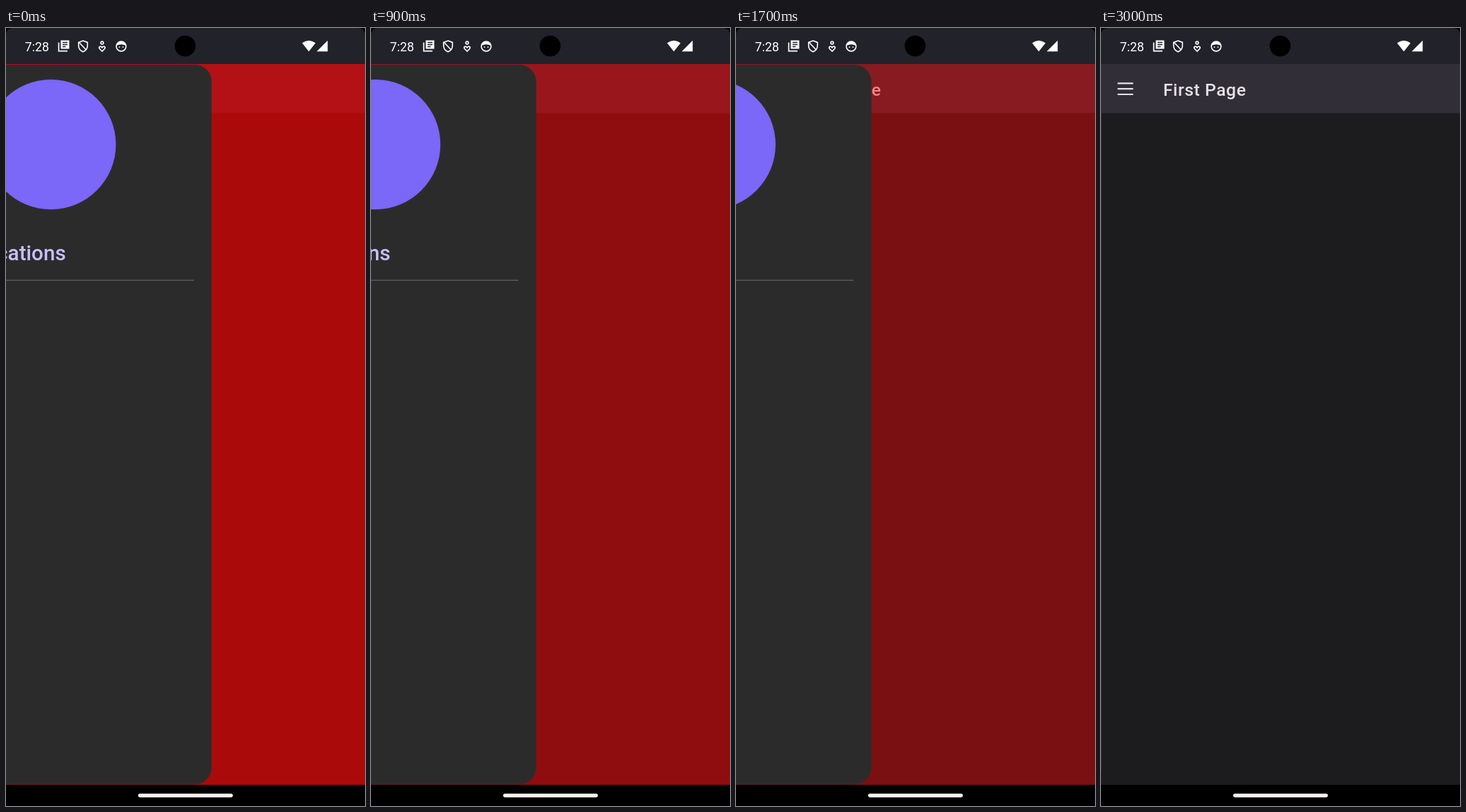
Write an HTML page that moves like this. It is 508 px wide and 1102 px high and loops after 3100 ms.

```html
<!DOCTYPE html>
<html lang="en">
<head>
<meta charset="utf-8">
<title>Navigation drawer</title>
<style>
  html, body { margin: 0; width: 100%; height: 100%; overflow: hidden; background: #000; }
  svg { display: block; width: 508px; height: 1102px; font-family: Roboto, sans-serif; }
  .title { font-size: 24.7px; font-weight: 500; letter-spacing: .55px; fill: #e6e1e5; }
  .item { font-size: 29.64px; font-weight: 500; fill: #c8bfff; }
  .clock { font-size: 17.7px; fill: #fff; }
</style>
</head>
<body>
<svg viewBox="0 0 508 1102">
  <defs>
    <clipPath id="content"><rect y="51" width="508" height="1021"/></clipPath>
  </defs>

  <g clip-path="url(#content)">
    <rect y="51" width="508" height="1021" fill="#1c1b1d"/>
    <rect y="51" width="508" height="69.5" fill="#312e38"/>
    <path d="M23.5 78.3h22M23.5 86.2h22M23.5 94h22" stroke="#e6e1e5" stroke-width="2.2"/>
    <text class="title" x="88" y="95.6">First Page</text>
    <rect id="scrim" y="51" width="508" height="1021" fill="#f00"/>

    <!-- The drawer's right edge is its local x = 0 -->
    <g id="drawer">
      <rect x="-460" y="52" width="460" height="1019.5" rx="24" fill="#2c2b2c"/>
      <circle cx="-227.5" cy="165" r="92" fill="#7b67f8"/>
      <text class="item" x="-376.5" y="329">Notifications</text>
      <path d="M-435 357.3H-25" stroke="#5f5c61" stroke-width="1.3"/>
      <text class="item" x="-376.5" y="409.5">Help</text>
    </g>
  </g>

  <!-- Status bar -->
  <path d="M0 51V10Q0 0 10 0H498Q508 0 508 10V51Z" fill="#21222a"/>
  <circle cx="253.5" cy="25.5" r="14.8"/>
  <text class="clock" x="26.8" y="32.6">7:28</text>
  <g fill="#fff">
    <path d="M77.5 17.5h12v12h-12z"/>
    <path d="M80 20.5h7M80 23.5h7M80 26.5h4.5" stroke="#21222a" stroke-width="1.3"/>
    <path d="M74.6 20.5V32.6H87" fill="none" stroke="#fff" stroke-width="1.7"/>
    <path d="M428.5 33.3L419 21.3Q428.500 14.300 438 21.300Z"/>
    <path d="M455.200 17.700V33.200H439.700Z"/>
  </g>
  <g fill="none" stroke="#fff" stroke-width="1.6">
    <path d="M109 18l6.300 2.400v4.600q0 6-6.300 8.700q-6.300-2.700-6.300-8.700v-4.600zM103.500 20.500l9.500 10"/>
    <circle cx="136" cy="21" r="1.900"/>
    <path d="M136 33l-3.700-3.700q-1.200-1.700 .3-2.800q1.700-1 3.400 1.200q1.700-2.200 3.400-1.200q1.500 1.100 .3 2.800z"/>
    <circle cx="163" cy="26" r="6.900"/>
  </g>
  <path d="M156.500 24.800Q157 19.500 163 19Q169 19.500 169.500 24.800Q163 21.500 156.500 24.800Z" fill="#fff"/>
  <path d="M160.500 26.300v1.600M165.500 26.300v1.600" stroke="#fff" stroke-width="1.500"/>

  <!-- Gesture bar -->
  <rect y="1072" width="508" height="30"/>
  <rect x="187" y="1084.500" width="134" height="5.200" rx="2.600" fill="#f5f2ef"/>
</svg>

<script>
  const LOOP = 3100, STEP = 100, OPEN_WIDTH = 462;
  const drawer = document.getElementById('drawer');
  const scrim = document.getElementById('scrim');

  // Drag path: [time in ms, right edge of the drawer]
  const path = [
    [0, 291], [200, 200], [300, 188], [500, 262], [600, 192.5], [700, 165],
    [1300, 355], [1700, 191.5], [2000, 106], [3000, 1]
  ];

  function slope(i) {
    const a = path[Math.max(i - 1, 0)];
    const b = path[Math.min(i + 1, path.length - 1)];
    return (b[1] - a[1]) / (b[0] - a[0]);
  }

  // Smooth cubic through the path points
  function edgeAt(t) {
    let i = 0;
    while (i < path.length - 2 && t >= path[i + 1][0]) i++;
    const [t0, x0] = path[i], [t1, x1] = path[i + 1];
    const d = t1 - t0, u = (t - t0) / d, v = 1 - u;
    return v * v * (1 + 2 * u) * x0 + u * u * (3 - 2 * u) * x1
      + d * u * v * (v * slope(i) - u * slope(i + 1));
  }

  const start = performance.now();

  function draw() {
    const t = (performance.now() - start) % LOOP;
    const edge = edgeAt(Math.floor(t / STEP) * STEP);
    drawer.setAttribute('transform', `translate(${edge.toFixed(2)} 0)`);
    scrim.setAttribute('opacity', edge > 2 ? edge / OPEN_WIDTH : 0);
    requestAnimationFrame(draw);
  }
  draw();
</script>
</body>
</html>
```
